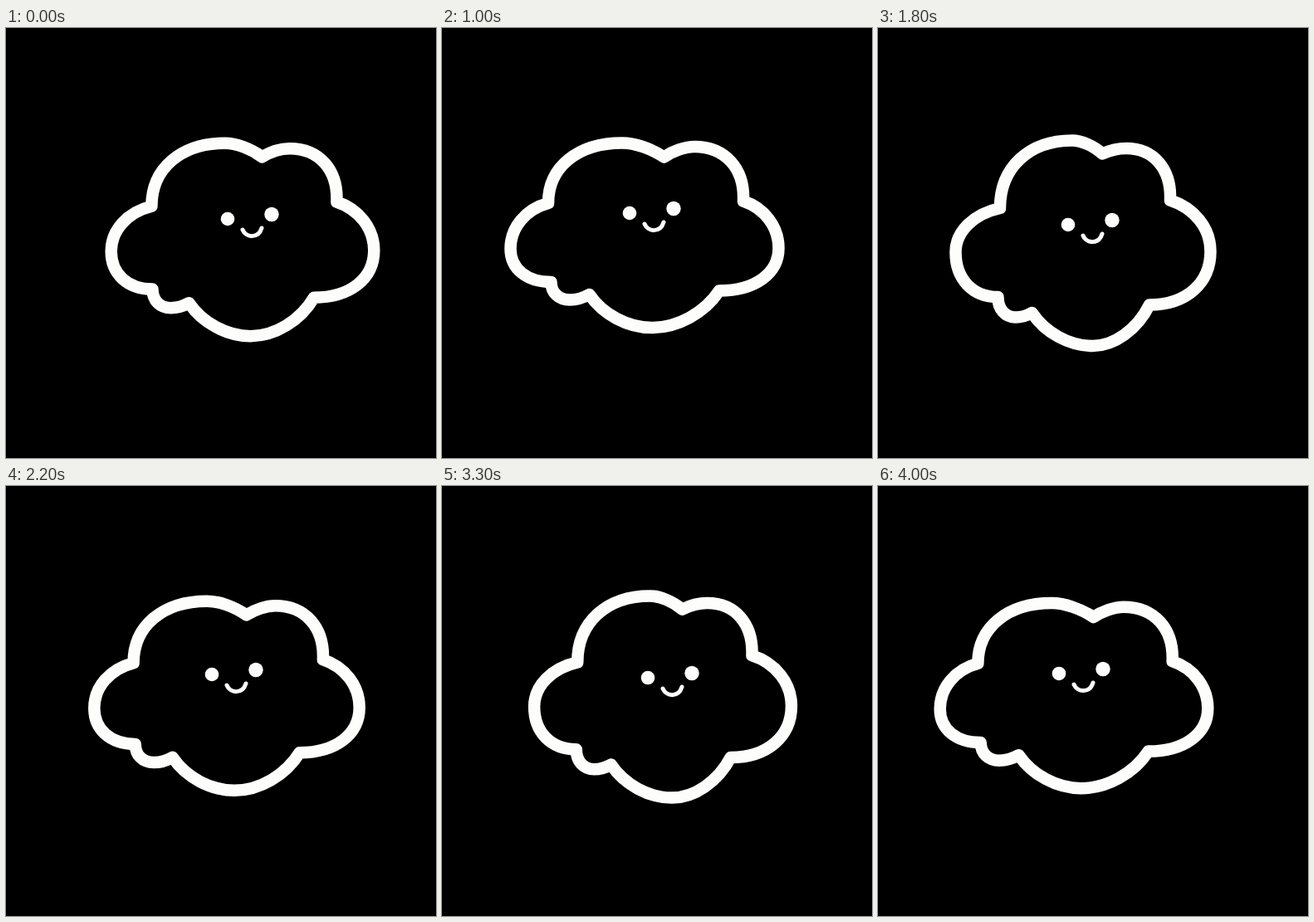
An HTML page that plays this animation: 518x518 px, repeating every 4.1 s.

```html
<!DOCTYPE html>
<html lang="en">
<head>
<meta charset="utf-8">
<title>Drifting cloud</title>
<style>
  html, body { margin: 0; width: 100%; height: 100%; overflow: hidden; background: #000; }
  svg { display: block; width: 100%; height: 100%; }
</style>
</head>
<body>
<svg viewBox="0 0 518 518">
  <g id="cloud" fill="none" stroke="#fdfdfb" stroke-linejoin="round" stroke-linecap="round">
    <path id="body" stroke-width="14.5"/>
    <g fill="#fdfdfb" stroke="none">
      <circle r="8.3"/>
      <circle cx="53" cy="-5.5" r="8.7"/>
    </g>
    <path d="M18 13C22 23 37 24 41 11" stroke-width="5"/>
  </g>
</svg>
<script>
const LOOP = 4100, STEP = 100, SWAY = LOOP / 1.5;

// Sway cycle: time, left eye x, y, squash
const KEYS = [
  [0, 267, 230, .2],
  [167, 265, 232, -.75],
  [367, 258.5, 236, -1.1],
  [567, 248, 231, -.65],
  [867, 234.5, 224, .75],
  [1000, 226, 223, 1],
  [1267, 218, 226, .95],
  [1533, 220.5, 233, -.2],
  [1800, 229, 237, -1],
  [2200, 248, 227, .55],
  [2400, 256.5, 225, .9],
  [2567, 264, 227.5, .65]
];

// Where lobes meet: x, y, and shift per unit of squash
const JOINTS = [
  [-90, -16, -8, 4],
  [41.5, -76.5, 0, 9],
  [130, -22, 7, 7.5],
  [103, 95, 5, -1.5],
  [-46, 102, -2.5, -4],
  [-89.5, 85, -5, -2]
];

// Lobe crests in the same form, then side flag and lean at both ends
const CRESTS = [
  [-2, -93, -7, 8.5, 0, 0, .5],
  [74, -86, 4, 6, 0, .5, -.05],
  [175.5, 37, 4, 5, 1, .25, 0],
  [28, 142, -1.5, -4, 0, .36, .36],
  [-67.5, 108, -4.5, -3.5, 0, .5, 0],
  [-139.5, 38, -4, 5, 1, 0, .22]
];

const cloud = document.getElementById('cloud');
const body = document.getElementById('body');

function keyAt(i) {
  const n = KEYS.length, turn = Math.floor(i / n);
  const [t, ...v] = KEYS[i - turn * n];
  return { t: t + turn * SWAY, v };
}

// Periodic cubic through the keys
function poseAt(t) {
  const i = KEYS.findLastIndex(k => k[0] <= t);
  const [a, b, c, d] = [-1, 0, 1, 2].map(o => keyAt(i + o));
  const span = c.t - b.t, u = (t - b.t) / span, w = 1 - u;
  return b.v.map((p, j) => {
    const q = c.v[j];
    const m0 = (q - a.v[j]) / (c.t - a.t) * span;
    const m1 = (d.v[j] - p) / (d.t - b.t) * span;
    return p * (1 + 2 * u) * w * w + m0 * u * w * w
         + q * u * u * (3 - 2 * u) - m1 * u * u * w;
  });
}

const place = ([x, y, dx, dy], s) => [x + s * dx, y + s * dy];
const mix = (p, q, k) => p.map((v, i) => v + (q[i] - v) * k);
const fmt = p => p.map(v => v.toFixed(2)).join(' ');

// Handles, joint side first, for the arc between a joint and a crest
function handles(joint, crest, side, lean) {
  const lead = mix(joint, crest, lean);
  const corner = side ? [crest[0], lead[1]] : [lead[0], crest[1]];
  return [mix(joint, corner, .6), mix(crest, corner, .6)];
}

function outline(s) {
  const pts = JOINTS.map(j => place(j, s));
  let d = 'M' + fmt(pts[0]);
  CRESTS.forEach((c, i) => {
    const from = pts[i], to = pts[(i + 1) % pts.length], top = place(c, s);
    const [, , , , side, leanA, leanB] = c;
    const up = handles(from, top, side, leanA);
    const down = handles(to, top, side, leanB).reverse();
    d += 'C' + [...up, top, ...down, to].map(fmt).join(' ');
  });
  return d + 'Z';
}

function draw(ms) {
  const t = Math.floor((ms % LOOP) / STEP) * STEP;
  const [x, y, s] = poseAt(t % SWAY);
  cloud.setAttribute('transform', `translate(${x} ${y})`);
  body.setAttribute('d', outline(s));
}

const start = performance.now();
function tick() {
  draw(performance.now() - start);
  requestAnimationFrame(tick);
}
tick();
</script>
</body>
</html>
```
